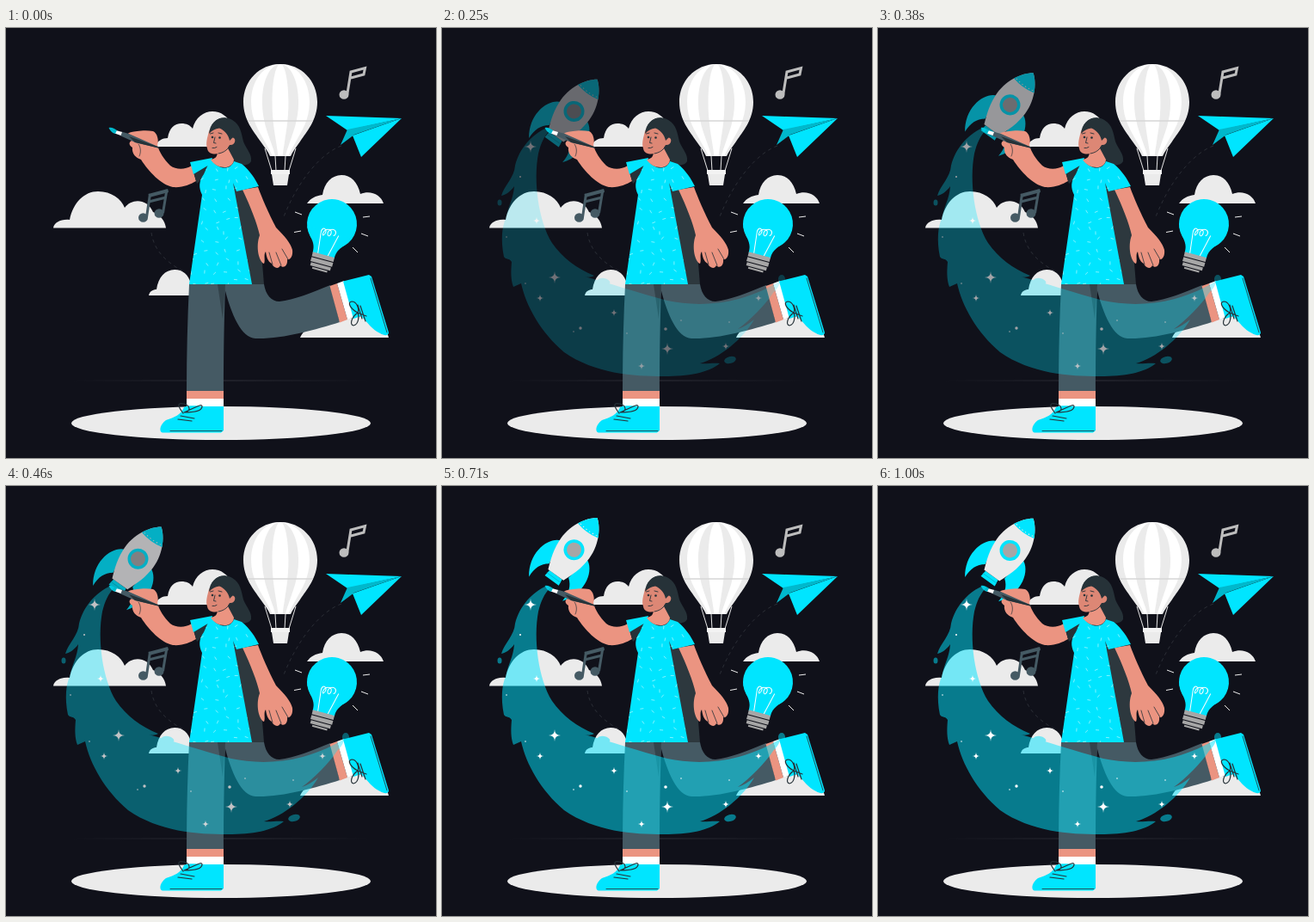
Recreate the animation shown at these times as an HTML page. Size 500 by 500 pixels, loop 1.04 s.

```html
<!DOCTYPE html>
<html lang="en">
<head>
<meta charset="utf-8">
<title>Painting a rocket</title>
<style>
html, body { margin: 0; height: 100%; overflow: hidden; background: #10111a; }
svg { display: block; width: 100vw; height: 100vh; }
.cyan { fill: #00e5ff; }
.pale { fill: #ebebeb; }
.skin { fill: #eb9481; }
.slate { fill: #455a64; }
.dark { fill: #263238; }
.white { fill: #fff; }
.line { fill: none; stroke: #263238; stroke-linecap: round; stroke-linejoin: round; }
</style>
</head>
<body>
<svg viewBox="0 0 500 500">
  <defs>
    <path id="gore" d="M0 42C24 42 43 61 43 86C43 107 31 120 23 132C18 139 14 144 12 149H-12C-14 144 -18 139 -23 132C-31 120 -43 107 -43 86C-43 61 -24 42 0 42Z"/>
    <path id="fin" class="cyan" d="M-18 0C-32 4 -42 32 -24 56C-25 44 -22 36 -14 30Z"/>
    <path id="dress" d="M238 152C246 165 261 166 265 155L274 158C284 166 290 176 294 184L268 190L264 180L286 298H213L228 194C224 186 224 178 230 170Z"/>
    <clipPath id="cut"><use href="#dress"/></clipPath>
    <linearGradient id="fade">
      <stop stop-color="#30313a" stop-opacity="0"/>
      <stop offset=".5" stop-color="#30313a"/>
      <stop offset="1" stop-color="#30313a" stop-opacity="0"/>
    </linearGradient>
  </defs>

  <rect x="76" y="409.5" width="348" height="1" fill="url(#fade)"/>
  <ellipse class="pale" cx="250" cy="459.5" rx="174" ry="19.5"/>

  <g class="pale">
    <path d="M55 232.500C56 226 64 222 74 223C78 203 91 190 107 190C123 190 134 199 138 209C146 198 164 198 171 214C179 217 185 224 186 232.500Z"/>
    <path d="M173 138C176 131 182 128 188 128C190 116 196 111 204 111C210 111 214 113 217 117C220 104 230 97 240 97C250 97 258 103 262 112V138Z"/>
    <path d="M166 311C167 306 171 304 175 304C177 290 185 281 196 281C206 281 212 287 215 297V311Z"/>
    <path d="M350 204C354 198 360 195 368 194C370 180 379 171 390 171C401 171 409 179 412 193C424 188 436 194 439 204Z"/>
    <path d="M342 360C345 352 354 347 366 345L436 330L445 360Z"/>
  </g>

  <g fill="none" stroke="#2b2e36" stroke-dasharray="4 4">
    <path d="M390 137C365 146 338 180 322 222"/>
    <path d="M169 238C172 258 185 272 208 284"/>
  </g>

  <!-- Balloon -->
  <g transform="translate(319)">
    <use href="#gore" fill="#ebebeb"/>
    <use href="#gore" fill="#fff" transform="scale(.79 1)"/>
    <use href="#gore" fill="#ebebeb" transform="scale(.49 1)"/>
    <use href="#gore" fill="#fff" transform="scale(.22 1)"/>
    <path d="M-38 108H38" stroke="#d6d6d6" stroke-width="1.500"/>
    <path d="M-18 140L-10 166M18 140L10 166M-6 149L-5 166M6 149L5 166" stroke="#e6e6e6"/>
    <path fill="#f2f2f2" d="M-11 165H11V170H-11Z"/>
    <path class="pale" d="M-10 170H10L8 183H-8Z"/>
  </g>

  <!-- Notes -->
  <g stroke="#bdbdbd" stroke-width="3">
    <path fill="none" d="M396.800 77L401 51L417.500 46.500L416 54L401 58"/>
    <ellipse fill="#bdbdbd" cx="393" cy="77.500" rx="4" ry="3.800"/>
  </g>
  <g class="slate" stroke="#455a64" stroke-width="3">
    <path d="M163.500 220L167.500 193M182.500 215L187 188M166 202L186 197"/>
    <path d="M166 195L188.500 189" stroke-width="4"/>
    <ellipse cx="159.500" cy="220.500" rx="4" ry="3.800"/>
    <ellipse cx="178" cy="215.500" rx="4" ry="3.800"/>
  </g>

  <!-- Paper plane -->
  <path class="cyan" d="M372 102L460 105L397 119ZM460 105L403 125L413 150Z"/>
  <path fill="#00b8cc" d="M397 118L460 105L405 124L389 136Z"/>

  <!-- Bulb -->
  <path d="M336 214L344 217M335 237.500L343 236M415 220L423 219M413 239L421 242M403 255L409 261" stroke="#eee"/>
  <g transform="translate(379 228) rotate(15)">
    <circle class="cyan" r="29"/>
    <path class="cyan" d="M-27 10C-20 24 -13 24 -13 38H13C13 24 20 24 27 10Z"/>
    <path d="M-7 37L-10 11C-9 4 -3 8 -5 13C-8 20 -9 8 -2 7C4 6 2 16 -1 14C-4 10 0 5 5 6C9 8 6 14 5 12M5 37L11 11" fill="none" stroke="#fff"/>
    <path fill="#a6a6a6" d="M-13 37H13V42H-13ZM-13 43H13V48H-13ZM-12 49H12V53H-12ZM-9 54H9V56H-9Z"/>
  </g>

  <g id="rocket" opacity="0">
    <g transform="translate(153.500 75.500) rotate(36)">
      <use href="#fin"/>
      <use href="#fin" transform="scale(-1 1)"/>
      <path class="cyan" d="M-9 36H9L10 44H-10Z"/>
      <path class="pale" d="M0 -46C10 -39 22 -20 20 2C19 18 13 30 11 36H-11C-13 30 -19 18 -20 2C-22 -20 -10 -39 0 -46Z"/>
      <path class="cyan" d="M0 -46C5 -42.500 10.500 -36 14.500 -27.600Q0 -24 -14.500 -27.600C-10.500 -36 -5 -42.500 0 -46Z"/>
      <path d="M-12 -29Q0 -26.500 12 -29" fill="none" stroke="#ebebeb" stroke-dasharray="1.500 3"/>
      <path d="M-10 40H10" stroke="#00b8cc" stroke-width=".8"/>
      <circle class="cyan" r="12"/>
      <circle r="8.500" fill="#a6a6a6"/>
    </g>
  </g>

  <!-- Legs -->
  <path class="slate" d="M253 298H300C302 310 308 318 318 318C335 316 355 308 377 299L388 342C360 351 320 362 290 361C274 360 262 335 253 298Z"/>
  <path class="slate" d="M213 298H255C254 330 253 370 253 422H210C210 380 211 340 213 298Z"/>
  <path fill="#33434b" d="M246 298H255L252 338Z"/>
  <path class="skin" d="M210 422H253V431H210ZM376.500 300L385 297L397 339L388 342.500Z"/>
  <path class="white" d="M210 431H253V441H210ZM385 297L393 294L406 336L397 339Z"/>
  <path class="cyan" d="M207 441C215 438 222 440 230 440H253V468L250 470.500H182C178 470 178 462 186 456C196 453 204 449 207 441Z"/>
  <path class="line" stroke-width=".8" d="M191 468.500H251"/>
  <path class="cyan" d="M392 294.500L422 287L425 289L445 354C445 358 440 358 435 355C426 351 420 342 413 335L404 338Z"/>
  <path class="line" stroke-width=".8" d="M424 291L443 354"/>
  <g class="line" stroke-width="1.200">
    <path d="M206 448C200 440 198 435 207 437C214 439 216 446 207 447C219 442 228 436 228 440C228 446 216 447 207 447M200 455L216 457M203 451L219 454"/>
    <path d="M409 331C401 327 396 319 402 318C408 318 411 327 409 331C402 336 399 345 404 346C410 345 411 335 409 331M409 322L414 338M412 323L418 341M409 331L419 335"/>
  </g>

  <!-- Body -->
  <path class="dark" d="M238 118C240 105 254 101 263 107C273 112 274 124 276 132C280 142 286 146 285 155C282 161 270 161 262 155L250 150Z"/>
  <path class="skin" d="M216 160C208 165 198 165 191 160C184 153 178 144 176 136C178 131 176 122 171 120C162 118 150 120 146 121C140 122 140 126 145 128L152 130C143 130 141 135 147 139C146 146 151 151 157 153C166 167 180 182 194 185C205 186 214 182 221 178Z"/>
  <path class="dark" d="M218 168L240 154L234 170L222 181Z"/>
  <path class="cyan" d="M214 156L240 151L238 158L218 170Z"/>
  <path d="M154 135C157 139 157 145 155 149" class="line" stroke-width=".7"/>
  <path class="slate" d="M134 120.500L143 123L178 138.500L177 139.500L150 133L132.500 125Z"/>
  <path class="dark" d="M143 126L178 138.500L177 139.500L150 133Z"/>
  <path class="white" d="M128 119L135 121L133.500 125L126.500 122.500Z"/>
  <path fill="#00b8cc" d="M119.500 116C123 115 126 117 129 119L127 123C123 122 121 119 119.500 116Z"/>
  <path fill="#2d383e" d="M262 178L276 189L294 225L300 298H285Z"/>
  <path class="skin" d="M275 188L293 185C297 196 305 215 314 232C324 242 331 250 333 258C334 266 330 270 327 269C328 277 322 280 319 276C317 281 311 279 309 274C304 271 303 266 302 260C299 264 302 270 300 274C294 272 290 254 295 241C292 227 284 207 275 188Z"/>
  <path class="line" stroke-width=".8" d="M306 261L310 275M314 261L320 276M321 257L328 269"/>
  <use href="#dress" class="cyan"/>
  <path id="flecks" clip-path="url(#cut)" fill="none" stroke="#a5f6ff" stroke-width=".8"/>

  <!-- Head -->
  <path class="skin" d="M246 143L257 138L265 153C264 166 244 164 238 153C244 152 246 149 246 143Z"/>
  <path fill="#dd8775" d="M236 120C234 128 232 134 234 140C235 147 243 147 247 146C253 145 258 140 260 136C267 137 269 127 262 127L262 116H240Z"/>
  <path class="dark" d="M236 123C237 108 250 101 260 106C268 108 271 118 270 128L264 127L260 131C259 124 253 118 248 116.500C243 117 240 119 236 123Z"/>
  <path class="line" stroke-width=".9" d="M237.500 123L241 122M247 122L251 123M243 127L241.500 133.500L244 134M240 139.500Q243 140 245 138.500M247 146Q254 145 258 140"/>
  <circle class="dark" cx="240" cy="127" r="1.300"/>
  <circle class="dark" cx="248.500" cy="127.500" r="1.300"/>

  <g id="trail" opacity="0">
    <g class="cyan" opacity=".5">
      <path d="M122 116C104 124 90 140 85 160C84 174 73 182 69 195C74 194 80 190 84 184C83 199 77 206 74 222C70 230 68 246 72 266C75 270 78 267 81 272C80 284 80 293 83 301C86 300 89 298 92 297C98 324 115 354 142 377C178 402 222 405 258 405C286 405 310 401 323 390C315 389 307 391 300 390C322 384 350 362 363 339C357 344 350 348 344 350C358 340 376 322 385 308C391 302 393 298 393 294C381 302 366 309 345 315C315 323 285 322 262 317C228 308 196 297 166 289C169 290 174 290 177 288C157 280 140 267 128 250C112 224 106 178 112 146C115 134 119 125 126 118Z"/>
      <ellipse cx="335" cy="386" rx="7" ry="4" transform="rotate(-15 335 386)"/>
      <ellipse cx="188" cy="295" rx="7.500" ry="4" transform="rotate(10 188 295)"/>
      <ellipse cx="67" cy="203" rx="2.500" ry="3.500"/>
      <ellipse cx="395" cy="292" rx="4" ry="5"/>
    </g>
    <path id="stars" class="white"/>
  </g>
</svg>
<script>
const get = id => document.getElementById(id);
const LOOP = 1040, RISE = 620;

let seed = 7;
const random = () => (seed = seed * 16807 % 2147483647) / 2147483647;

// Short strokes on a jittered grid
let flecks = "";
for (let y = 160; y < 298; y += 12) {
  for (let x = 214; x < 292; x += 13) {
    const a = random() * Math.PI, dx = 2 * Math.cos(a), dy = 2 * Math.sin(a);
    flecks += `M${x + random() * 7 - dx} ${y + random() * 7 - dy}l${2 * dx} ${2 * dy}`;
  }
}
get("flecks").setAttribute("d", flecks);

const sparkle = (x, y, r) =>
  `M${x} ${y - r}Q${x} ${y} ${x + r} ${y}Q${x} ${y} ${x} ${y + r}Q${x} ${y} ${x - r} ${y}Q${x} ${y} ${x} ${y - r}Z`;
const dot = (x, y, r) => `M${x - r} ${y}a${r} ${r} 0 1 0 ${2 * r} 0a${r} ${r} 0 1 0 ${-2 * r} 0Z`;

const sparkles = [[103, 138, 7], [131, 290, 7], [262, 373, 7], [368, 314, 4.5], [114, 314, 4.5],
  [200, 331, 4.5], [232, 393, 4.5], [330, 370, 4.5], [110, 224, 4.5]];
const dots = [[260, 350, 1.8], [161, 349, 1.7], [91, 173, 1], [75, 243, .8], [97, 297, .8],
  [153, 353, .8], [215, 355, .8], [334, 342, .8], [278, 340, .8]];
get("stars").setAttribute("d",
  sparkles.map(s => sparkle(...s)).join("") + dots.map(d => dot(...d)).join(""));

const rocket = get("rocket"), trail = get("trail");
const start = performance.now();

function draw(now) {
  const t = Math.max(0, now - start) % LOOP;
  const shown = Math.min(1, t / RISE);
  // Rise into place, then bob once
  const dy = t < RISE ? 36 * (1 - shown) : -2 * Math.sin(Math.PI * (t - RISE) / (LOOP - RISE));
  rocket.setAttribute("transform", `translate(0 ${dy})`);
  rocket.setAttribute("opacity", shown);
  trail.setAttribute("opacity", shown);
  requestAnimationFrame(draw);
}
draw(start);
</script>
</body>
</html>
```
